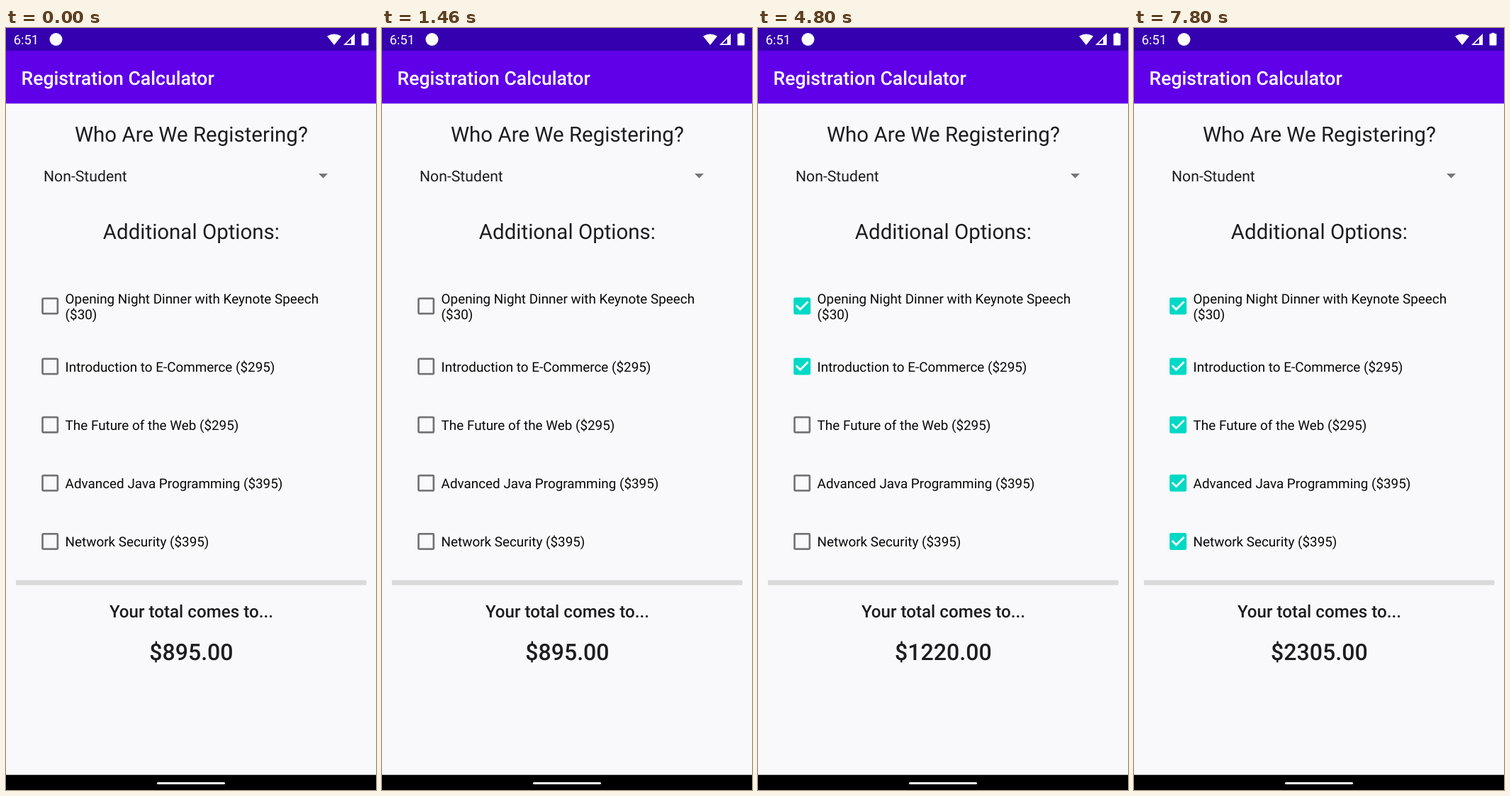
Recreate the animation shown at these times as an HTML page. Size 522 by 1073 pixels, loop 8 s.

```html
<!DOCTYPE html>
<html lang="en">
<head>
<meta charset="utf-8">
<title>Registration Calculator</title>
<style>
  html, body { margin: 0; width: 100%; height: 100%; overflow: hidden; background: #f9f9fb; }
  svg { display: block; width: 522px; height: 1073px; font-family: Roboto, sans-serif; fill: #1d1d20; }
  text { text-rendering: geometricPrecision; }
  .medium { font-weight: 500; }
  .center { text-anchor: middle; }
  .heading { font-size: 29.48px; }
  .option { font-size: 18.87px; fill: #080808; }
  .white { fill: #fff; }
</style>
</head>
<body>
<svg viewBox="0 0 522 1073">
  <rect width="522" height="1073" fill="#f9f9fb"/>
  <rect width="522" height="106.400" fill="#5f00e8"/>
  <rect width="522" height="32" fill="#3500af"/>

  <g class="white">
    <text x="10.700" y="23" font-size="18.4">6:51</text>
    <circle cx="70.5" cy="16" r="9"/>
    <path d="M453 11.500Q463 5.500 473 11.500L463 24Z"/>
    <path fill-rule="evenodd" d="M492 8V24H476ZM490.300 12V22.300H487V15.300L480 22.300H490.300Z"/>
    <path d="M504.500 8V6.800H508.500V8H510.500Q511.500 8 511.500 9V23.500Q511.500 24.500 510.500 24.500H502.500Q501.500 24.500 501.500 23.500V9Q501.500 8 502.500 8Z"/>
    <text class="medium" x="21.600" y="79.500" font-size="26.58">Registration Calculator</text>
  </g>

  <text class="heading center" x="261.400" y="160">Who Are We Registering?</text>
  <text x="53" y="215.500" font-size="21.2">Non-Student</text>
  <path d="M441 205H454L447.500 211.500Z" fill="#757577"/>
  <text class="heading center" x="261.400" y="297">Additional Options:</text>

  <g id="options"></g>

  <rect x="14" y="777.500" width="494.500" height="7" fill="#d9d9d9"/>
  <text class="medium center" x="261.400" y="830" font-size="24.17">Your total comes to...</text>
  <text class="medium center" id="total" x="261.400" y="890" font-size="32.1"></text>

  <rect y="1051.700" width="522" height="21.300" fill="#000"/>
  <rect class="white" x="213" y="1062" width="96" height="3" rx="1.500"/>
</svg>
<script>
const LOOP = 8000, BASE_FEE = 895;
const GREY = [115, 115, 117], TEAL = [0, 217, 197];

// y: checkbox centre, at: time of the tap in ms
const options = [
  { lines: ['Opening Night Dinner with Keynote Speech', '($30)'], price: 30, y: 391.5, at: 2850 },
  { lines: ['Introduction to E-Commerce ($295)'], price: 295, y: 476.5, at: 4250 },
  { lines: ['The Future of the Web ($295)'], price: 295, y: 558.7, at: 5300 },
  { lines: ['Advanced Java Programming ($395)'], price: 395, y: 640.8, at: 6260 },
  { lines: ['Network Security ($395)'], price: 395, y: 723, at: 7010 }
];

const list = document.getElementById('options');
const total = document.getElementById('total');
const progress = (t, start, length) => Math.min(1, Math.max(0, (t - start) / length));
const ease = p => p * p * (3 - 2 * p);

function add(parent, tag, attributes, text = '') {
  const node = document.createElementNS('http://www.w3.org/2000/svg', tag);
  for (const name in attributes) node.setAttribute(name, attributes[name]);
  node.textContent = text;
  return parent.appendChild(node);
}

for (const option of options) {
  const firstLine = option.y + (option.lines.length > 1 ? -3.7 : 7.3);
  option.lines.forEach((line, i) =>
    add(list, 'text', { class: 'option', x: 83.6, y: firstLine + i * 22.2 }, line));

  const box = add(list, 'g', { transform: `translate(62.2 ${option.y})` });
  option.frame = add(box, 'rect', { x: -12, y: -12, width: 24, height: 24, rx: 2.7 });
  option.hole = add(box, 'rect', { fill: '#f9f9fb' });
  option.tick = add(box, 'path', {
    d: 'M-8.400 -.95L-2.670 4.780L8.400 -6.300', fill: 'none', stroke: '#fff',
    'stroke-width': 2.67, pathLength: 1, 'stroke-dasharray': '1 2'
  });
}

function draw(t) {
  let sum = BASE_FEE;
  for (const { at, price, frame, hole, tick } of options) {
    if (t >= at) sum += price;
    const fill = ease(progress(t, at, 150));
    const stroke = ease(progress(t, at + 150, 170));
    const half = 9.33 * (1 - fill);
    const colour = GREY.map((c, i) => Math.round(c + (TEAL[i] - c) * fill));
    frame.setAttribute('fill', `rgb(${colour})`);
    for (const side of ['x', 'y']) hole.setAttribute(side, -half);
    for (const side of ['width', 'height']) hole.setAttribute(side, half * 2);
    tick.setAttribute('stroke-dashoffset', 1 - stroke);
    tick.setAttribute('visibility', stroke ? 'visible' : 'hidden');
  }
  total.textContent = `$${sum.toFixed(2)}`;
}

function play() {
  draw(performance.now() % LOOP);
  requestAnimationFrame(play);
}
play();
</script>
</body>
</html>
```
